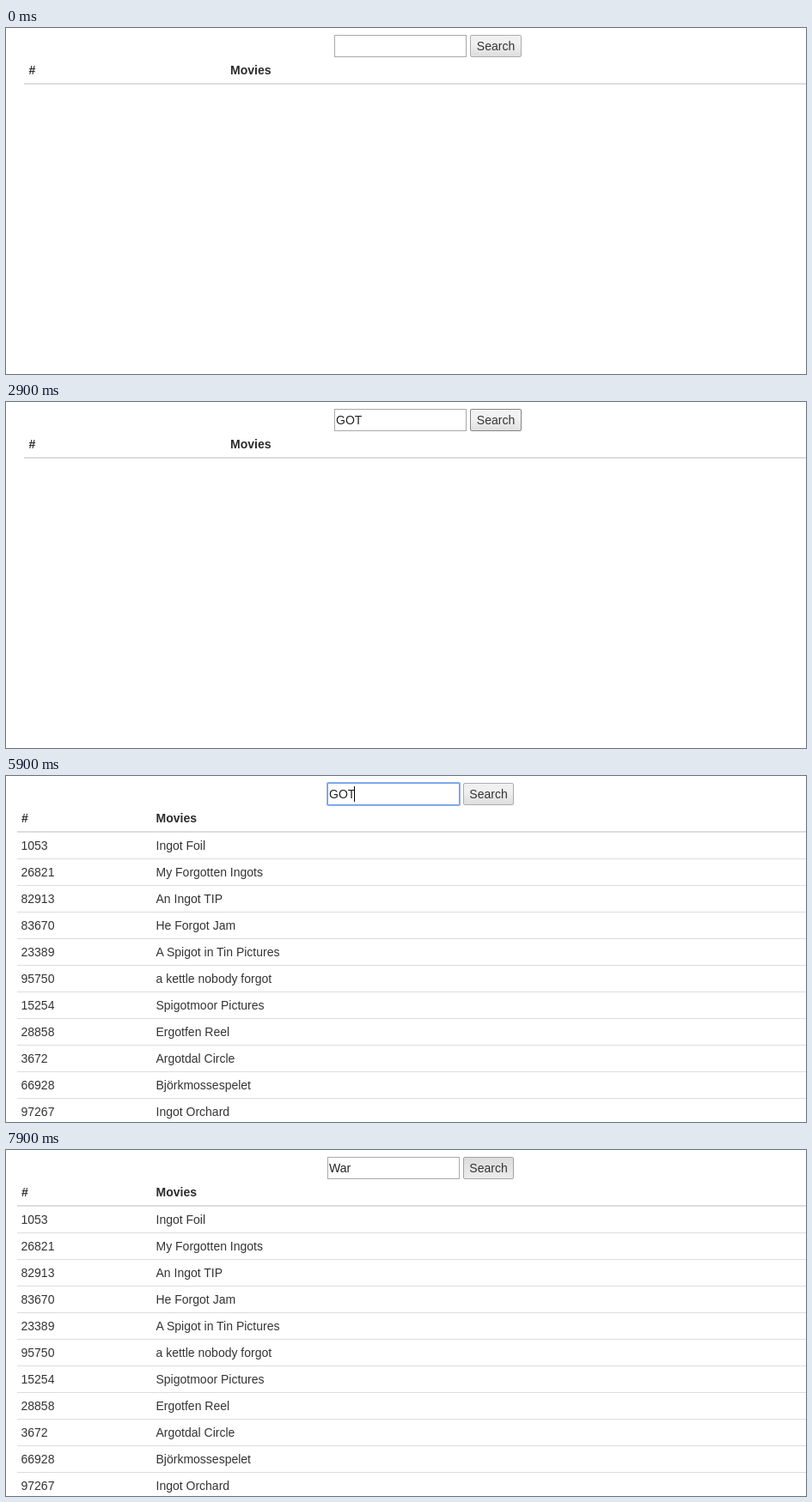
Write an HTML page that moves like this. It is 931x403 px and loops after 8000 ms.

```html
<!DOCTYPE html>
<html lang="en">
<head>
<meta charset="utf-8">
<title>Movie search</title>
<style>
  html, body { margin: 0; width: 100%; height: 100%; overflow: hidden; background: #fff; }
  body { position: relative; font: 14px/20px "Liberation Sans", Arial, sans-serif; color: #333; }
  div, span { position: absolute; box-sizing: border-box; white-space: pre; }
  #field { top: 8px; width: 154px; height: 26px; border: 1px solid #a9a9a9; background: #fff; }
  #field.focus { border-color: #6a9de8; box-shadow: 0 0 0 1px #8fb5ee; border-radius: 1px; }
  #typed { left: 1px; top: 3px; height: 18px; line-height: 18px; color: #222; }
  #typed.selected { width: 29px; background: #3297fd; color: #fff; }
  #caret { top: 12px; width: 1px; height: 18px; background: #000; }
  #button { top: 8px; height: 26px; border: 1px solid #adadad; border-radius: 2px; line-height: 24px;
    text-align: center; background: linear-gradient(#f0f0f0 38%, #dedede); }
  #button.hover { border-color: #858585; background: linear-gradient(#f2f2f2 38%, #e0e0e0); }
  #button.pressed { border-color: #a2a2a2; background: linear-gradient(#dcdcdc, #ececec); }
  .head { top: 39px; font-weight: bold; color: #2b2b2b; }
  .rule { right: 0; height: 1px; background: #ddd; }
  #headRule { top: 64px; height: 2px; }
</style>
</head>
<body>
<div id="field"><span id="typed"></span></div>
<div id="caret"></div>
<div id="button">Search</div>
<span class="head" id="numberHead">#</span>
<span class="head" id="movieHead">Movies</span>
<div class="rule" id="headRule"></div>
<div id="results"></div>
<script>
const LOOP = 8000;
const $ = id => document.getElementById(id);

const movies = [
  [1053, "Ingot Foil"],
  [26821, "My Forgotten Ingots"],
  [82913, "An Ingot TIP"],
  [83670, "He Forgot Jam"],
  [23389, "A Spigot in Tin Pictures"],
  [95750, "a kettle nobody forgot"],
  [15254, "Spigotmoor Pictures"],
  [28858, "Ergotfen Reel"],
  [3672, "Argotdal Circle"],
  [66928, "Björkmossespelet"],
  [97267, "Ingot Orchard"]
];

$("results").style.cssText = "left:0;top:66px;width:100%;height:337px;overflow:hidden";
$("results").innerHTML = movies.map(([number, title], i) => {
  const y = i * 31;
  return `<span style="left:17.5px;top:${y + 5}px">${number}</span>` +
    `<span style="left:174.5px;top:${y + 5}px">${title}</span>` +
    `<div class="rule" style="left:13px;top:${y + 30}px"></div>`;
}).join("");

// Each entry: start time and the properties that change then.
// caret is an offset from the left edge of the field, or null when hidden.
const timeline = [
  [0, { text: "", caret: null, focus: false, selected: false, button: "", results: false }],
  [700, { focus: true, caret: 2 }],
  [1100, { caret: null }],
  [1500, { text: "G", caret: 13 }],
  [1700, { text: "GO", caret: 23 }],
  [1900, { text: "GOT", caret: 31 }],
  [2400, { caret: null }],
  [2700, { button: "hover" }],
  [2900, { focus: false }],
  [3800, { results: true }],
  [4300, { button: "" }],
  [5900, { focus: true, caret: 31 }],
  [6000, { selected: true, caret: null }],
  [6400, { text: "W", selected: false, caret: 14 }],
  [6700, { text: "Wa", caret: 22 }],
  [7000, { text: "War", caret: 27 }],
  [7500, { caret: null }],
  [7800, { button: "hover" }],
  [7900, { button: "pressed", focus: false }]
];

const setLeft = (id, x) => { $(id).style.left = x + "px"; };

function render(time) {
  const state = Object.assign({}, ...timeline.filter(([at]) => at <= time).map(([, change]) => change));
  const { results } = state;
  const fieldX = results ? 374 : 382;

  setLeft("field", fieldX);
  setLeft("button", results ? 532 : 540);
  $("button").style.width = (results ? 59 : 60) + "px";
  setLeft("numberHead", results ? 18 : 26.5);
  setLeft("movieHead", results ? 174.5 : 261);
  setLeft("headRule", results ? 13 : 21);
  $("results").hidden = !results;

  $("field").className = state.focus ? "focus" : "";
  $("button").className = state.button;
  $("typed").textContent = state.text;
  $("typed").className = state.selected ? "selected" : "";
  $("caret").hidden = state.caret === null;
  setLeft("caret", fieldX + (state.caret ?? 0));
}

const start = performance.now();
function tick() {
  render((performance.now() - start) % LOOP);
  requestAnimationFrame(tick);
}
tick();
</script>
</body>
</html>
```
